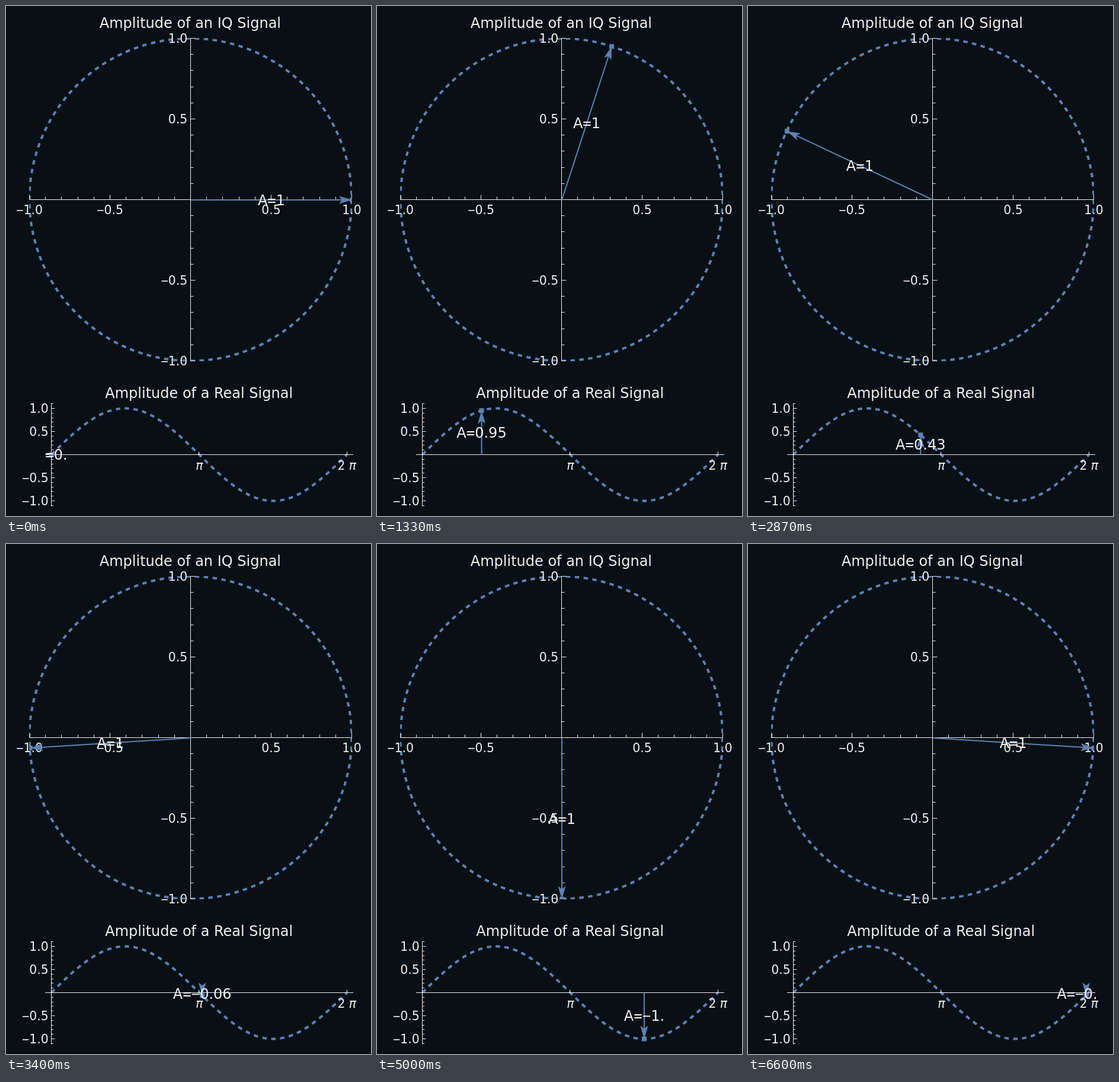
Recreate the animation shown at these times as an HTML page. Size 616x860 px, loop 6.67 s.

```html
<!DOCTYPE html>
<html lang="en">
<head>
<meta charset="utf-8">
<title>Signal amplitude</title>
<style>
  html, body { margin: 0; width: 100%; height: 100%; overflow: hidden; background: #091015; }
  svg { display: block; width: 616px; height: 860px; }
  text { font: 20.4px "DejaVu Sans", sans-serif; fill: #f0f0f0; white-space: pre; }
  .big { font-size: 24px; }
  .op { font-family: "DejaVu Sans Mono", monospace; }
  .mid { text-anchor: middle; }
  .end { text-anchor: end; }
  .it { font-style: italic; }
  .axis { stroke: #ededed; stroke-width: 1; fill: none; }
  .curve { stroke: #5e81b5; stroke-width: 4; stroke-dasharray: 7.49 7.49; fill: none; }
  .shaft { stroke: #5e81b5; stroke-width: 2; }
  .solid { fill: #5e81b5; }
</style>
</head>
<body>
<svg id="stage" viewBox="0 0 616 860">
  <clipPath id="clipIQ"><rect x="39" y="54" width="545" height="545"/></clipPath>
  <clipPath id="clipReal"><rect x="66" y="670" width="521.5" height="174"/></clipPath>
</svg>
<script>
const stage = document.getElementById('stage');
const TAU = 2 * Math.PI;
const iq = { x: 311.5, y: 326.5, r: 272 };
const real = { x: 76.5, y: 756.5, w: 499, h: 78 };

function add(parent, tag, attrs) {
  const el = document.createElementNS('http://www.w3.org/2000/svg', tag);
  for (const key in attrs) el.setAttribute(key, attrs[key]);
  parent.appendChild(el);
  return el;
}

// Operators use the narrower monospaced glyphs.
function setText(el, str) {
  el.innerHTML = str.replace(/-/g, '−').replace(/[=−]/g, '<tspan class="op">$&</tspan>');
}

function label(parent, x, y, str, cls) {
  setText(add(parent, 'text', { x, y, class: cls }), str);
}

function drawIQ(g) {
  const { x, y, r } = iq;
  add(g, 'path', {
    class: 'curve', 'clip-path': 'url(#clipIQ)',
    d: `M${x + r} ${y}A${r} ${r} 0 0 1 ${x - r} ${y}A${r} ${r} 0 0 1 ${x + r} ${y}`
  });
  let d = `M${x - r} ${y}H${x + r}M${x} ${y - r}V${y + r}`;
  for (let i = -10; i <= 10; i++) {
    if (!i) continue;
    const p = Math.round(i * r / 10), major = i % 5 === 0, len = major ? 8 : 5;
    d += `M${x + p} ${y}v${-len}M${x} ${y - p}h${len}`;
    if (major) {
      const str = (i / 10).toFixed(1);
      label(g, x + p, 351, str, 'mid');
      label(g, 306.3, y - p + 7.5, str, 'end');
    }
  }
  add(g, 'path', { class: 'axis', d });
  label(g, 310.9, 37, 'Amplitude of an IQ Signal', 'big mid');
}

function drawReal(g) {
  const { x, y, w, h } = real;
  let wave = '';
  for (let i = 0; i <= 200; i++) {
    wave += `${i ? 'L' : 'M'}${x + w * i / 200} ${y - h * Math.sin(TAU * i / 200)}`;
  }
  add(g, 'path', { class: 'curve', 'clip-path': 'url(#clipReal)', d: wave });
  let d = `M66 ${y}H586M${x} 670V843.5M325.5 ${y}v-5M575.5 ${y}v-5`;
  for (let i = -11; i <= 11; i++) {
    const p = Math.round(i * h / 10), major = i && i % 5 === 0;
    d += `M${x} ${y - p}h${major ? 6 : 3.5}`;
    if (major) label(g, 71.8, y - p + 7.5, (i / 10).toFixed(1), 'end');
  }
  add(g, 'path', { class: 'axis', d });
  label(g, 326.5, 781.5, 'π', 'mid it');
  label(g, 559.5, 781.5, '2', '');
  label(g, 585, 781.5, 'π', 'mid it');
  label(g, 325.7, 661, 'Amplitude of a Real Signal', 'big mid');
}

function makeArrow(clip) {
  const g = add(stage, 'g', { 'clip-path': `url(#${clip})` });
  return {
    shaft: add(g, 'line', { class: 'shaft' }),
    head: add(g, 'path', { class: 'solid', d: 'M0 0L-22 -6.5L-17 0L-22 6.5Z' }),
    dot: add(g, 'rect', { class: 'solid', width: 8, height: 8 }),
    text: add(g, 'text', { class: 'big mid' })
  };
}

function place(arrow, x1, y1, x2, y2, str) {
  const dx = x2 - x1, dy = y2 - y1, len = Math.hypot(dx, dy);
  const set = (el, attrs) => { for (const k in attrs) el.setAttribute(k, attrs[k]); };
  const k = len > 17 ? (len - 17) / len : 0;
  set(arrow.shaft, { x1, y1, x2: x1 + dx * k, y2: y1 + dy * k });
  set(arrow.head, {
    transform: `translate(${x2} ${y2}) rotate(${Math.atan2(dy, dx) * 360 / TAU})`,
    visibility: len > 0.01 ? 'visible' : 'hidden'
  });
  set(arrow.dot, { x: x2 - 4, y: y2 - 4 });
  set(arrow.text, { x: (x1 + x2) / 2, y: (y1 + y2) / 2 + 8.5 });
  setText(arrow.text, str);
}

// Two decimals without trailing zeros, keeping the point: 0.95, 0.9, 1.
function short(v) {
  const n = Math.round(v * 100) / 100 || 0;
  return Number.isInteger(n) ? n + '.' : String(n);
}

drawIQ(add(stage, 'g', {}));
drawReal(add(stage, 'g', {}));
const phasor = makeArrow('clipIQ');
const sample = makeArrow('clipReal');

const LOOP = 6670, STEPS = 100;
const stepStart = n => Math.round(n * 20 / 3) * 10;

function stepAt(t) {
  const n = Math.floor((t + 4) * 3 / 200);
  return stepStart(n) > t ? n - 1 : n;
}

let shown = -1;
function draw(t) {
  const n = stepAt(t % LOOP);
  if (n === shown) return;
  shown = n;
  const u = n / STEPS, s = Math.sin(TAU * u), c = Math.cos(TAU * u);
  const x0 = iq.x + 0.5, y0 = iq.y + 0.5;
  place(phasor, x0, y0, x0 + iq.r * c, y0 - iq.r * s, 'A=1');
  const x = real.x + real.w * u + 0.2;
  place(sample, x, real.y, x, real.y - real.h * s, 'A=' + short(s));
}

const start = performance.now();
function tick() {
  draw(performance.now() - start);
  requestAnimationFrame(tick);
}
tick();
</script>
</body>
</html>
```
